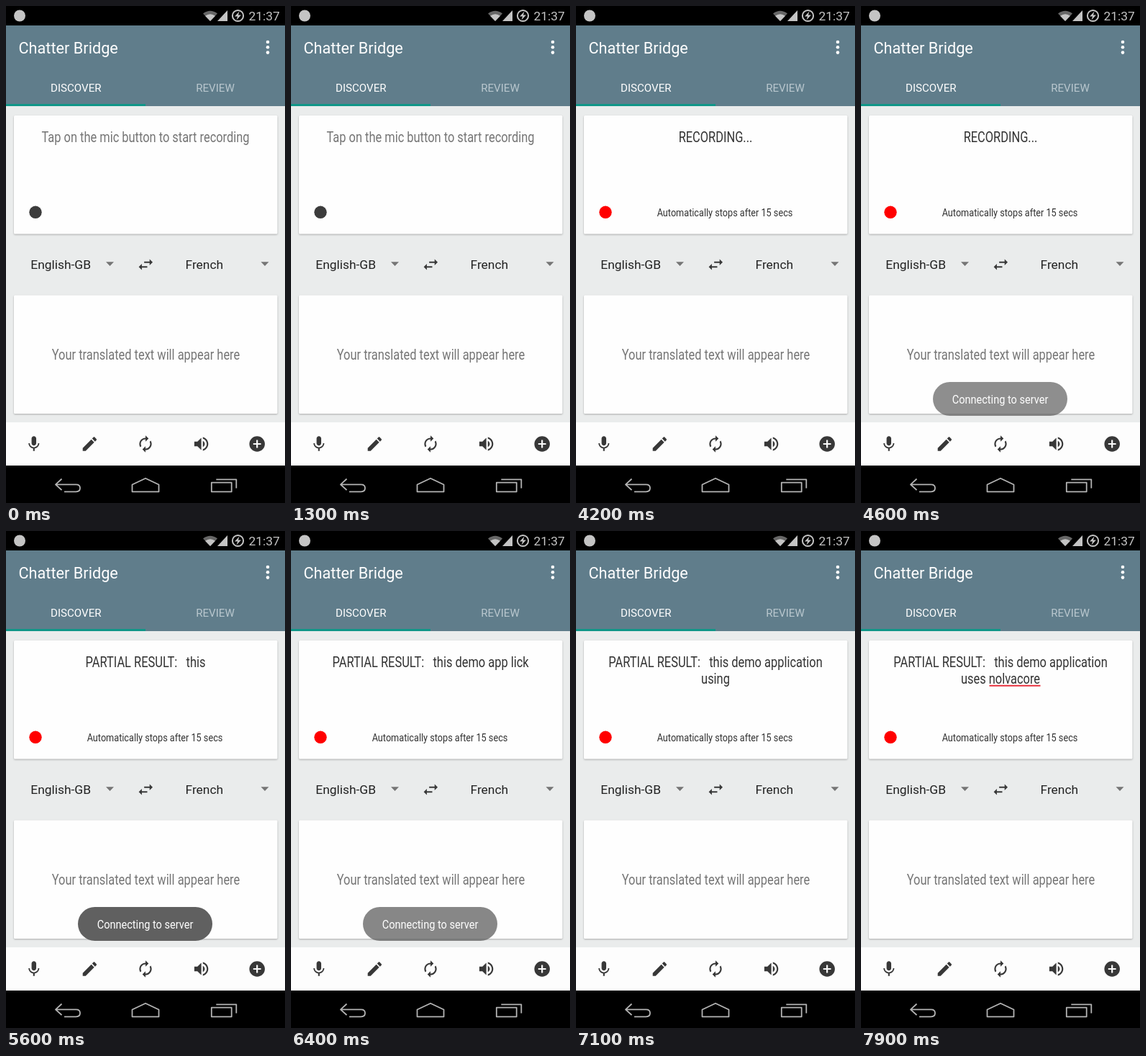
Animation, 388 px wide and 690 px high, one loop 8000 ms. Source, as an HTML page:

```html
<!DOCTYPE html>
<html lang="en">
<head>
<meta charset="utf-8">
<title>Speech screen</title>
<style>
  html, body { margin: 0; width: 100%; height: 100%; overflow: hidden; background: #000; }
  svg { display: block; width: 388px; height: 690px; font-family: Roboto, "Liberation Sans", sans-serif; }
  text { white-space: pre; }
  .mid { text-anchor: middle; }
  /* condensed face */
  .cond { text-anchor: middle; font-size: 19.4px; transform-box: fill-box; transform-origin: center; transform: scaleX(.847); }
  .card { fill: #fefefe; filter: drop-shadow(0 1px 1px rgba(0, 0, 0, .28)); }
  .nav { fill: none; stroke: #b4b4b4; stroke-width: 1.8; stroke-linejoin: round; }
</style>
</head>
<body>
<svg viewBox="0 0 388 690">
  <rect width="388" height="690"/>
  <rect y="27" width="388" height="112" fill="#607d8b"/>
  <rect y="139" width="388" height="439" fill="#eaecec"/>
  <rect y="136" width="194" height="3" fill="#109688"/>
  <rect y="578" width="388" height="60" fill="#fdfdfd"/>

  <!-- status bar -->
  <g fill="#c4c4c4">
    <circle cx="19" cy="13.5" r="8"/>
    <path d="M274 10.5Q284 3 294 10.5L284 21Z" fill="#666"/>
    <path d="M277 13.7Q284 8.6 291 13.7L284 21Z"/>
    <path d="M308 6V21H294Z"/>
    <circle cx="322.5" cy="13.5" r="7.6" fill="none" stroke="#c4c4c4" stroke-width="2"/>
    <path d="M324.5 7.5L318 14.5H322L320.5 19.5L327 12.5H323Z"/>
    <text x="337.5" y="20" font-size="17.4">21:37</text>
  </g>

  <!-- header -->
  <g fill="#fff">
    <text x="17.5" y="66" font-size="21.7">Chatter Bridge</text>
    <circle cx="364" cy="50" r="2.3"/>
    <circle cx="364" cy="57.3" r="2.3"/>
    <circle cx="364" cy="64.6" r="2.3"/>
    <text class="mid" x="97.3" y="119.3" font-size="15.1">DISCOVER</text>
    <text class="mid" x="291" y="119.3" font-size="15.1" fill="#b9c7ce">REVIEW</text>
  </g>

  <!-- cards -->
  <rect class="card" x="11" y="152" width="366.5" height="164.5" rx="1.5"/>
  <rect class="card" x="11" y="401.5" width="366.5" height="164.5" rx="1.5"/>
  <text id="line1" class="cond" x="194" y="189"></text>
  <text id="line2" class="cond" x="194" y="211.6" fill="#333"></text>
  <path id="underline" d="M178.5 214.7H249.5" stroke="#e8303c" stroke-width="2"/>
  <circle id="dot" cx="41" cy="286.3" r="8.7"/>
  <text id="note" class="cond" x="207" y="292" fill="#333" style="font-size:15px">Automatically stops after 15 secs</text>
  <text class="cond" x="194.5" y="491" fill="#757575">Your translated text will appear here</text>

  <!-- language row -->
  <g fill="#222">
    <text x="34.3" y="365" font-size="17.4">English-GB</text>
    <text x="249.5" y="365" font-size="17.4">French</text>
    <path d="M139 355.2H150L144.5 361ZM354.5 355.2H365.5L360 361Z" fill="#757575"/>
  </g>
  <g id="icons" fill="#383838"></g>

  <!-- navigation bar -->
  <g class="nav">
    <path d="M77.5 656.5L69 664.3L77.5 672M69 664.3H97.5Q103 664.3 103 669.3Q103 674.3 97.5 674.3H81"/>
    <path d="M175.5 674.3V664.5L194 655.7L212.5 664.5V674.3Z"/>
    <path d="M285.8 661.7H313.7V674.3H285.8ZM292.3 657.3H320.3V669.5"/>
  </g>

  <g id="toast">
    <rect x="100" y="522" width="187" height="47" rx="23.5" fill="#606060"/>
    <text class="cond" x="193.5" y="552" fill="#fff" style="font-size:17.2px">Connecting to server</text>
  </g>
</svg>
<script>
  const $ = id => document.getElementById(id);
  const LOOP = 8000, RECORD = 4200;

  // 24-unit glyphs placed by their centre
  const icons = [
    [194.3, 359, "M6.99 11L3 15l3.99 4v-3H14v-2H6.99v-3zM21 9l-3.99-4v3H10v2h7.01v3L21 9z"],
    [38.8, 608, "M12 14c1.66 0 2.99-1.34 2.99-3L15 5c0-1.66-1.34-3-3-3S9 3.34 9 5v6c0 1.66 1.34 3 3 3zm5.3-3c0 3-2.54 5.1-5.3 5.1S6.7 14 6.7 11H5c0 3.41 2.72 6.23 6 6.72V21h2v-3.28c3.28-.48 6-3.3 6-6.72h-1.7z"],
    [116.4, 608, "M3 17.25V21h3.75L17.81 9.94l-3.75-3.75L3 17.25zM20.71 7.04c.39-.39.39-1.02 0-1.41l-2.34-2.34c-.39-.39-1.02-.39-1.41 0l-1.83 1.83 3.75 3.75 1.83-1.83z"],
    [194, 608, "M12 6v3l4-4-4-4v3c-4.42 0-8 3.58-8 8 0 1.57.46 3.03 1.24 4.26L6.7 14.8c-.45-.83-.7-1.79-.7-2.8 0-3.31 2.69-6 6-6zm6.76 1.74L17.3 9.2c.44.84.7 1.79.7 2.8 0 3.31-2.69 6-6 6v-3l-4 4 4 4v-3c4.42 0 8-3.58 8-8 0-1.57-.46-3.03-1.24-4.26z"],
    [271.6, 608, "M3 9v6h4l5 5V4L7 9H3zm13.5 3c0-1.77-1.02-3.29-2.5-4.03v8.05c1.48-.73 2.5-2.25 2.5-4.02zM14 3.23v2.06c2.89.86 5 3.54 5 6.71s-2.11 5.85-5 6.71v2.06c4.01-.91 7-4.49 7-8.77s-2.99-7.86-7-8.77z"],
    [349.2, 608, "M12 2a10 10 0 1 0 0 20 10 10 0 1 0 0-20zm5 11h-4v4h-2v-4H7v-2h4V7h2v4h4v2z"]
  ];
  $("icons").innerHTML = icons.map(([x, y, d]) =>
    `<path transform="translate(${x} ${y}) scale(1.078) translate(-12 -12)" fill-rule="evenodd" d="${d}"/>`).join("");

  const partial = words => "PARTIAL RESULT:   this" + words;
  const steps = [
    [0, "Tap on the mic button to start recording", ""],
    [RECORD, "RECORDING...", ""],
    [5400, partial(""), ""],
    [5800, partial(" demo"), ""],
    [6200, partial(" demo app lick"), ""],
    [6600, partial(" demo application"), ""],
    [6850, partial(" demo application use"), ""],
    [7100, partial(" demo application"), "using"],
    [7500, partial(" demo application"), "uses"],
    [7800, partial(" demo application"), "uses nolvacore"]
  ];

  const ramp = (t, start, length) => Math.min(1, Math.max(0, (t - start) / length));
  const show = (id, on) => $(id).setAttribute("visibility", on ? "visible" : "hidden");
  const setText = (id, text) => { if ($(id).textContent !== text) $(id).textContent = text; };

  function draw(now) {
    const t = now % LOOP, recording = t >= RECORD;
    const [, first, second] = steps.filter(s => s[0] <= t).pop();
    setText("line1", first);
    setText("line2", second);
    $("line1").setAttribute("fill", recording ? "#333" : "#757575");
    $("dot").setAttribute("fill", recording ? "#f00" : "#3c3c3c");
    show("note", recording);
    show("underline", t >= 7800);
    $("toast").setAttribute("opacity", ramp(t, 4250, 500) - ramp(t, 6250, 600));
  }

  function frame() {
    draw(performance.now());
    requestAnimationFrame(frame);
  }
  frame();
</script>
</body>
</html>
```
